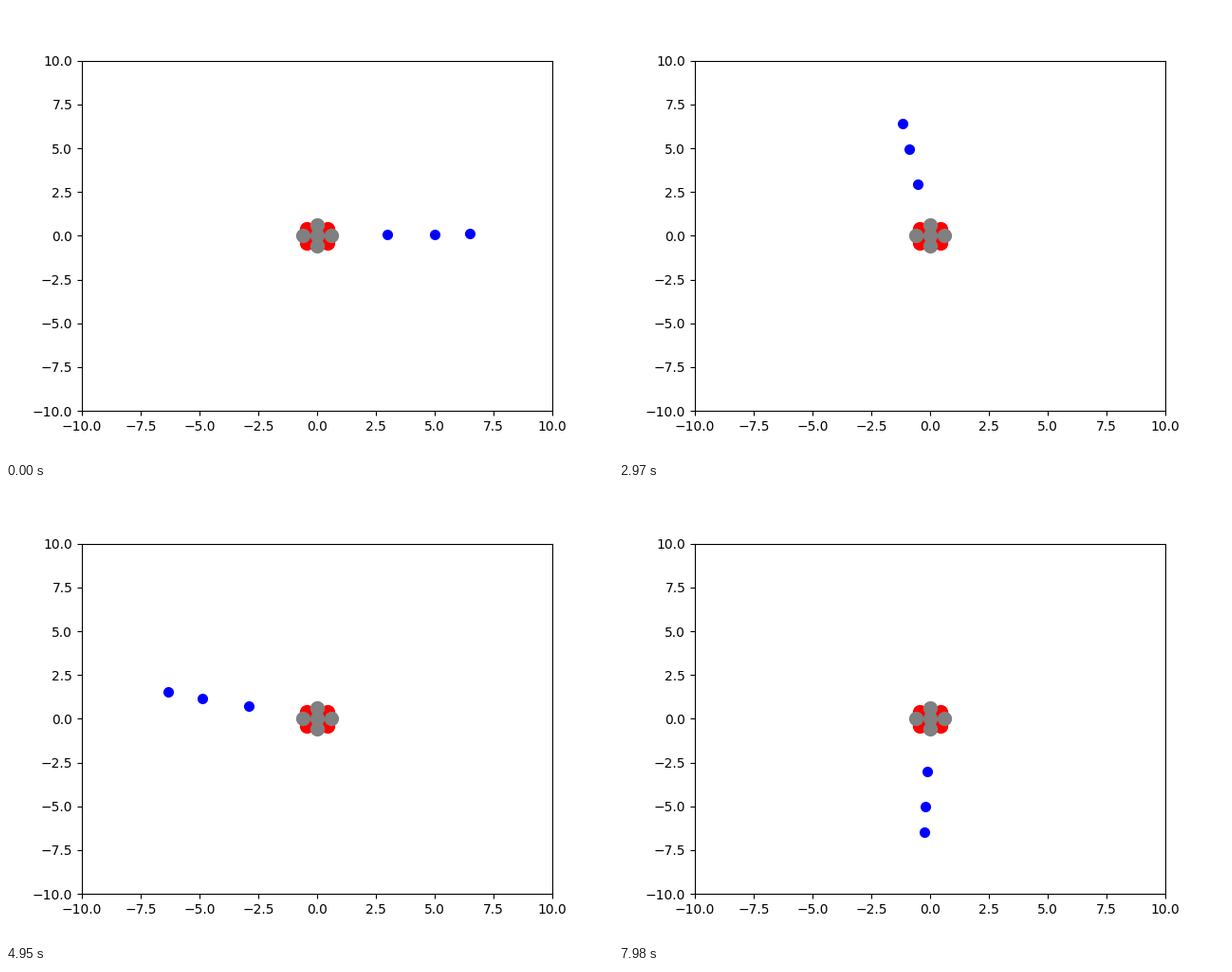
These frames come from a looping animation (640x480 px, 8000 ms). A matplotlib script:

```python
import numpy as np
import matplotlib.pyplot as plt
from matplotlib.animation import FuncAnimation

FRAMES, INTERVAL = 400, 20      # 8 s loop
STEP_MS = 30                    # the electrons advance once per step
TURN = 2 * np.pi / 359          # angle per step
RADII = np.array([3, 5, 6.5])
CORE = 0.6

fig, ax = plt.subplots(figsize=(6.4, 4.8), dpi=100)
ax.set_xlim(-10, 10)
ax.set_ylim(-10, 10)


def dots(x, y, color, size):
    return ax.plot(x, y, "o", color=color, markersize=size)[0]


quarter = np.arange(4) * np.pi / 2
diag = quarter + np.pi / 4
dots(CORE * np.cos(diag), CORE * np.sin(diag), "red", 10)
dots(np.append(CORE * np.cos(quarter), 0),
     np.append(CORE * np.sin(quarter), 0), "gray", 10)
electrons = dots([], [], "blue", 7)


def update(i):
    step = round(i * INTERVAL / STEP_MS)
    angle = (step + 1) * TURN
    electrons.set_data(RADII * np.cos(angle), RADII * np.sin(angle))
    return electrons,


anim = FuncAnimation(fig, update, frames=FRAMES, interval=INTERVAL,
                     repeat=True, repeat_delay=0)
plt.show()
```
